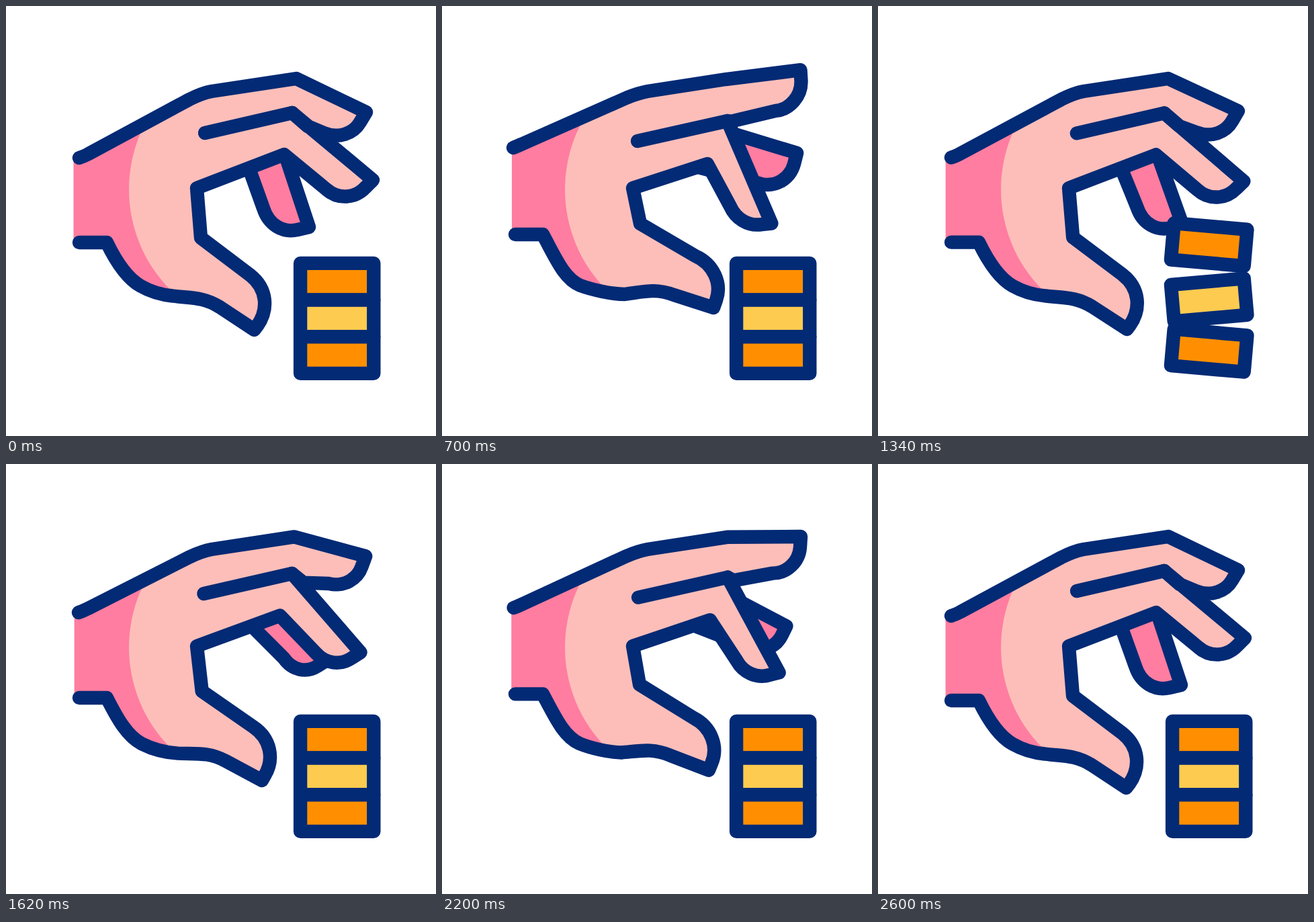
Animation of 640x640 px, one loop 2820 ms. Source, as an HTML page:

```html
<!DOCTYPE html>
<html lang="en">
<head>
<meta charset="utf-8">
<title>Hand and blocks</title>
<style>
  html, body { margin: 0; width: 100%; height: 100%; overflow: hidden; background: #fff; }
  svg { display: block; width: 100%; height: 100%; }
  .line { fill: none; stroke: #032a75; stroke-width: 20.4; stroke-linecap: round; stroke-linejoin: round; }
  .pink { fill: #ff7da0; }
  .skin { fill: #fdbeb9; }
</style>
</head>
<body>
<svg viewBox="0 0 640 640">
  <clipPath id="palm"><circle cx="395" cy="273" r="212"/></clipPath>
  <path id="ring" class="line" style="fill:#ff7da0"/>
  <path id="cuff" class="pink"/>
  <path id="skin" class="skin" clip-path="url(#palm)"/>
  <path id="edge" class="line"/>
  <path id="crease" class="line"/>
  <g id="blocks"></g>
</svg>
<script>
const LOOP = 2820;
const $ = id => document.getElementById(id);

// Each part: [closed pose, open pose], with matching commands.
const parts = {
  edge: [
    `M109 226 C114 224.5 118 222.5 122 220.5 L273 139 C284 133.5 295 129 306 127
     L432 108 L536 158 L527 173 C517 190 495 198 473 189 L449 179
     L426 159 L546 259 L535 270 C519 287 494 288 477 273 L414 221
     L284 271 L290 345 L364 401 C389 421 391 452 374 476 L369.5 482
     L318 448 C294 433 276 435 248 431.5 C230 429.8 214 424.6 200 416.5
     C180 405 164 381 150 352 L109 352`,
    `M105.8 209.8 C110.8 207.8 114.8 205.8 118.8 204.3 L275.2 136.3 C286.2 131.9 295 129 306 127
     L421.7 109.1 L533.3 90.3 L535.1 107.1 C536.4 129.5 519.9 150.5 498.9 153.3 L428.5 171.4
     L424.9 172 L486 328.7 L471.3 329.4 C449.9 331.3 432.4 318.2 425.2 300 L393.5 236.1
     L284 271 L295.4 322.3 L378 369.7 C405.2 381 419.1 409.9 410.7 435 L406.8 446.4
     L347.2 428.6 C319.9 419 304.1 424.2 273.9 428.8 C253.8 428.9 222.6 421.8 206.5 416
     C182.2 406.1 170.5 376.7 150 339 L109 339`
  ],
  wrist: ['L100.5 352 L100.5 230Z', 'L104.2 339 L104.2 212Z'],
  crease: ['M296 189 L426 159', 'M290.6 202 L424.9 172'],
  ring: [
    'M417 226 L451 329 L434 333 C412 338 391 326 383 301 L364 248',
    'M431 186 L534.2 210.2 L531.2 227.2 C526.5 250.5 505.5 265.5 482.4 262.1 L383.4 239.4'
  ]
};

const number = /\d+(\.\d+)?/g;
const ease = u => u * u * (3 - 2 * u);

// Eased there-and-back swing, 0 to 1 to 0.
function swing(t, start, half) {
  const u = (t - start) / half;
  return u <= 0 || u >= 2 ? 0 : ease(u < 1 ? u : 2 - u);
}

function morph([from, to], p) {
  const ends = to.match(number);
  let i = 0;
  return from.replace(number, n => (+n + (ends[i++] - n) * p).toFixed(2));
}

const blocks = [
  { y: 410.2, color: '#ff8f00', lift: 77, turn: 7 },
  { y: 464.9, color: '#fdcb50', lift: 38.5, turn: -7 },
  { y: 519.6, color: '#ff8f00', lift: 9.6, turn: 7 }
];
for (const b of blocks) {
  b.node = document.createElementNS('http://www.w3.org/2000/svg', 'rect');
  const attrs = { class: 'line', x: -54.6, y: -27.3, width: 109.2, height: 54.6 };
  for (const key in attrs) b.node.setAttribute(key, attrs[key]);
  b.node.style.fill = b.color;
  $('blocks').append(b.node);
}

function draw(t) {
  const open = swing(t, 200, 600) + swing(t, 1400, 600);
  const edge = morph(parts.edge, open);
  const hand = edge + morph(parts.wrist, open);
  $('edge').setAttribute('d', edge);
  $('cuff').setAttribute('d', hand);
  $('skin').setAttribute('d', hand);
  $('crease').setAttribute('d', morph(parts.crease, open));
  $('ring').setAttribute('d', morph(parts.ring, open));

  const hop = swing(t, 800, 400);
  for (const b of blocks) {
    b.node.setAttribute('transform',
      `translate(492.7 ${b.y - b.lift * hop}) rotate(${b.turn * hop})`);
  }
}

const begin = performance.now();
function tick() {
  draw((performance.now() - begin) % LOOP);
  requestAnimationFrame(tick);
}
draw(0);
requestAnimationFrame(tick);
</script>
</body>
</html>
```
